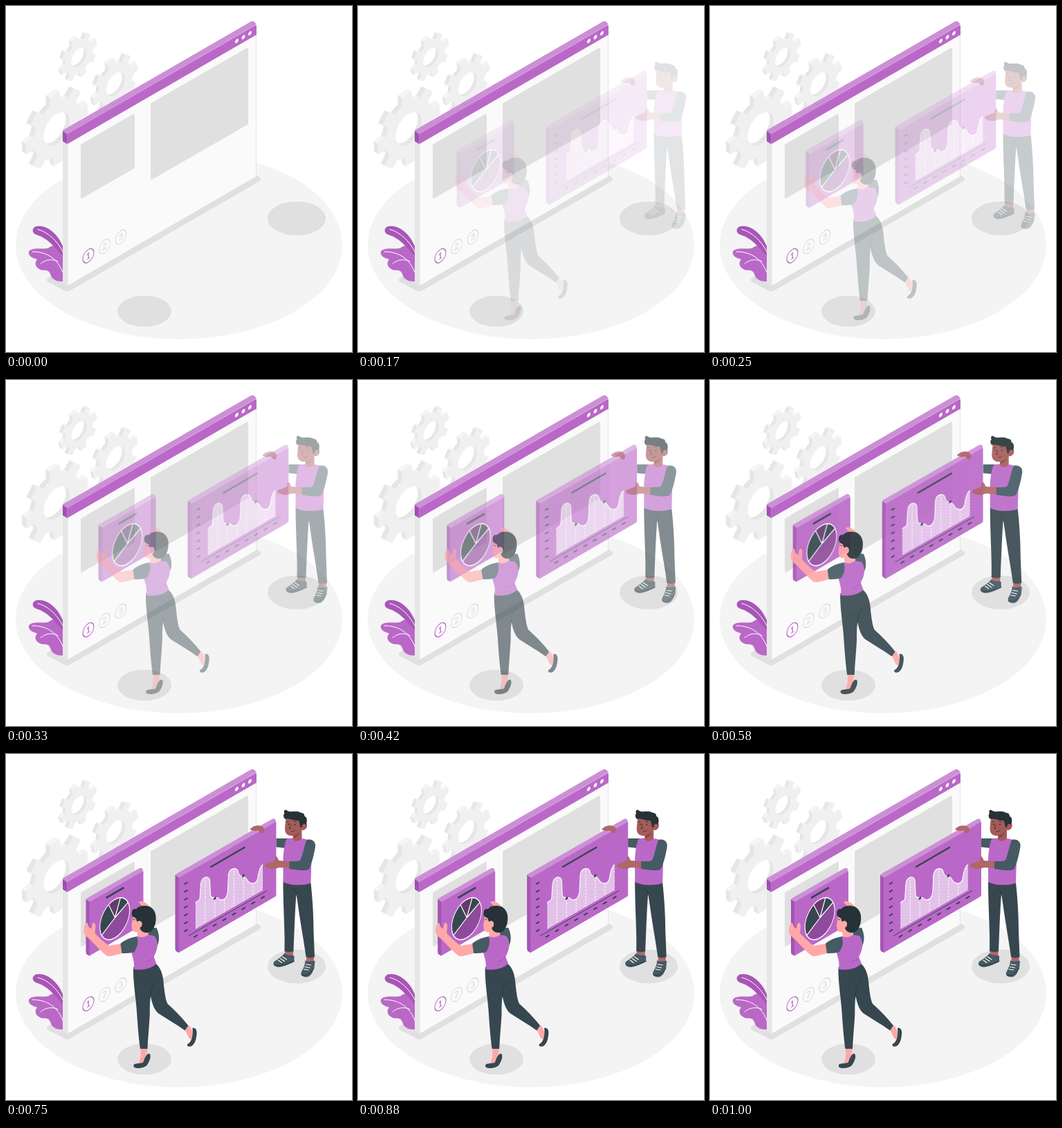
Animation, 500 px wide and 500 px high, one loop 1040 ms. Source, as an HTML page:

```html
<!DOCTYPE html>
<html lang="en">
<head>
<meta charset="utf-8">
<title>Page building</title>
<style>
  html, body { margin: 0; width: 100%; height: 100%; overflow: hidden; background: #fff; }
  svg { display: block; width: 100%; height: 100%; }
  .round { stroke-linejoin: round; stroke-width: 3; }
  .line { fill: none; stroke-linecap: round; stroke-linejoin: round; }
  .line.flat { stroke-linecap: butt; }
  .num { font: 600 12.5px Lato, "Open Sans", sans-serif; text-anchor: middle; }
</style>
</head>
<body>
<svg viewBox="0 0 500 500">
  <ellipse cx="250" cy="345.5" rx="236" ry="136" fill="#f4f4f4"/>
  <g fill="#e0e0e0">
    <ellipse cx="420" cy="307" rx="42" ry="24.5"/>
    <ellipse cx="200" cy="441" rx="39" ry="22.5"/>
    <path d="M62 392L82 385L362 245L367 247.500Q370 250 366 253.500L93 411Q88 414 84 411L61 399Q56 395 62 392Z"/>
  </g>
  <g id="gears"></g>

  <!-- plant -->
  <path fill="#ba68c8" d="M82 349C76 345 66 345 61 350C52 352 38 348 33 355C32 361 37 364 45 366C41 371 42 377 48 380C52 383 57 381 61 383C65 386 64 391 68 394C72 398 77 398 82 398Z"/>
  <path fill="#a855b7" d="M82 347C74 327 57 315 43 318.500C36 322 38 329 45 331C59 335 69 347 82 361Z"/>
  <g class="line" stroke="#fff" stroke-width="1">
    <path d="M46 323C60 326 74 339 82 355M38 355C60 355 75 366 82 385M50 372.500C57 366 68 365 75 369"/>
  </g>

  <!-- window -->
  <path fill="#e6e6e6" d="M82 195L89 199V405L82 401Z"/>
  <path fill="#fafafa" stroke="#e0e0e0" stroke-width=".8" d="M89 199L361.500 41V246.500L89 404.500Z"/>
  <path fill="#cc8fd6" d="M82 181.500Q81.500 180 83 179L353 23Q356 21 359 23L362 26.500L88.500 185Z"/>
  <path fill="#ba68c8" d="M88.500 185L360 28Q362 27 362 29V41.500L88.500 199.500Z"/>
  <path fill="#a04fb0" d="M82 181L88.500 185V199.500L82 195.500Z"/>
  <g id="dots" fill="#fff"></g>
  <g class="round" fill="#e0e0e0" stroke="#e0e0e0">
    <path d="M109.500 201L184.500 157.500V233.500L109.500 276.500Z"/>
    <path d="M210.500 141.500L348.500 62V170L210.500 249.500Z"/>
  </g>
  <g id="steps"></g>

  <g class="moving" id="cards"></g>

  <g class="moving">
    <!-- man -->
    <path fill="#455a64" d="M392 122L410 122L405 136L392 134.500Z"/>
    <path fill="#b16668" d="M354 109C358 104 364 102 370 104C375 106 376 110 373 115C368 115 369 111 365 110.500C361 112 358 111 354 109Z"/>
    <path fill="#b16668" d="M405 284H417L416 293L404 291ZM435.500 292H447L446 301H435.500Z"/>
    <path fill="#37474f" d="M402 184C412 190 432 190 442 186C444 205 446 230 446 255L447.500 293C443 295 439 295 435 293C432 270 427 245 423 215L421 202C419 230 418 260 417 285C412 287 408 286 404 285C405 260 402 220 402 184Z"/>
    <path class="line" stroke="#263238" stroke-width=".8" d="M421 204Q421 197 416 194"/>
    <path fill="#455a64" d="M404 288C409 293 415 289 418 292V300C412 303 405 307 396 308C390 308 386 304 389 300C394 297 400 293 404 288ZM434 298C438 302 444 298 448 299L447 309C445 314 443 320 438 322C432 323 427 321 428 316C430 311 434 306 434 298Z"/>
    <path class="line" stroke="#fff" stroke-width="1.200" d="M401 293L407 297M398 295.500L404 299.500M395 298L400 301.500M435 304L442 305M433.500 307.500L440.500 309M432 311L438.500 312"/>
    <path class="line" stroke="#263238" stroke-width=".9" d="M389 304.500Q394 309 418 299.500M428.500 319Q437 324 446.500 310"/>
    <path fill="#ba68c8" d="M407 123C412 121 428 121 436 123.500L443 150L442 186C432 191 412 190 402 185V150C403 138 404 130 407 123Z"/>
    <path fill="#a55b58" d="M406 91L404.500 108C404.500 116 410 119 416.500 118L416 123C419 128 427 126 429 121.500L429 110C434 111 437.500 106 436.500 102C435 98 430 99 429 103L424 95Z"/>
    <path fill="#854640" d="M416.500 118C421 117 424 115 426 112C425 117 421 121 416.300 121Z"/>
    <path fill="#263238" d="M405 94C402 92 402 87 404 86C402 82 405 79 408 82C413 85 421 81 428 85C432 85 433 88 433 90C437 91 437 98 435 103C433 99 430 100 428.500 107C425 105 427 99 424 96C417 97 411 92 405 94Z"/>
    <g fill="#263238"><circle cx="410" cy="101.500" r="1"/><circle cx="419" cy="102" r="1"/></g>
    <path class="line" stroke="#263238" stroke-width=".8" d="M407 98.500L410 97.500M417.500 97L421 98.500M413 102L411 107.500L413.500 108M414 112Q417 112.500 419 110.500"/>
    <path fill="#b16668" d="M412 155L396 154L393 148.500C391 147 389.500 150 390 154L377 159C374 161 376 164 380 164.500C386 167 391 166 396 164L412 165Z"/>
    <path fill="#455a64" d="M436 124C444 122 449.500 127 448.500 134C447 143 444 157 440 165C438 170 425 168 411 166V155C419 155 426 156 427.500 152C431 144 432 134 436 124Z"/>

    <!-- woman -->
    <path fill="#ffa8a7" d="M193 214C197 211 202 214 206 217L213 224L212 228L200 222Z"/>
    <path fill="#455a64" d="M207 252L219 251C223 259 224 270 220 277L207 268Z"/>
    <path fill="#ffa8a7" d="M196 425H206L204 436C202 443 199 447 192 449C196 442 197 435 196 425ZM260 398L266 392C270 397 273 405 271 413L266 411Z"/>
    <path fill="#37474f" d="M186 449C190 446 198 448 200 445C202 439 205 432 209 433C212 437 209 444 205 450C200 455 188 455 186 452ZM271 396C276 395 278 400 277 406C276 413 275 418 270 422C266 424 262 422 264 419C270 416 272 408 271 396Z"/>
    <path fill="#37474f" d="M185.500 308C195 312 208 308 218 303C226 309 229 322 229.500 334C231 346 232 355 235 361C245 370 256 381 265 392.500L260 399.500C247 390 234 383 222 375C216 370 213 362 210.500 350C208.500 365 210 372 209 382C208 398 206.500 413 206 426H195.500C193.500 413 192 395 190.500 372C189 350 185 330 185.500 308Z"/>
    <path class="line" stroke="#263238" stroke-width=".8" d="M210.500 350Q209 336 218 328"/>
    <path fill="#ba68c8" d="M187 265C197 260 208 261 216 263C222 270 222 281 215 293L219 303C210 311 197 313 186 311C188 300 184 292 182 284Z"/>
    <path class="line" stroke="#9a4fa9" stroke-width=".8" d="M215 293Q211 299 204 300"/>
    <path fill="#ffa8a7" d="M187 230C184 238 184 243 183 247C183 255 185 258 191 257L192 264C198 266 206 264 207 259L206 240Z"/>
    <path fill="#263238" d="M184 234C182 229 184 222 190 224C193 219 203 218 210 221C217 225 219 233 218 241C217 250 213 257 207 258C201 259 196 256 195 251C199 248 199 243 195 241C192 241 191 244 190 240C190 236 187 237 184 234Z"/>
    <ellipse cx="194.500" cy="246" rx="3.500" ry="4.500" fill="#ffa8a7"/>
    <path class="line" stroke="#263238" stroke-width=".8" d="M185.500 239L188 239.500"/>
    <path fill="#ffa8a7" d="M116 246C113 252 113 259 117 263C126 270 138 285 147 291.500C150 293 155 292 169 288V274L150 277C143 272 136 265 130 259L131 248C130 243 127 242 126 247L125 252C122 252 121 250 120 246C119 243 117 243 116 246Z"/>
    <path fill="#455a64" d="M167 274C172 269 182 265 190 264C194 270 191 280 187 286C181 288 174 288 169 288Z"/>
  </g>
</svg>
<script>
const NS = "http://www.w3.org/2000/svg";
const $ = id => document.getElementById(id);
const PURPLE = "#ba68c8", DARK = "#37474f";

function add(parent, tag, attrs, text) {
  const el = document.createElementNS(NS, tag);
  for (const k in attrs) el.setAttribute(k, attrs[k]);
  if (text) el.textContent = text;
  parent.appendChild(el);
  return el;
}
const path = (parent, d, attrs) => add(parent, "path", { d, ...attrs });
const line = (parent, d, stroke, width, extra) =>
  path(parent, d, { class: "line", stroke, "stroke-width": width, ...extra });
const flat = (parent, d, stroke, width, extra) =>
  line(parent, d, stroke, width, { class: "line flat", ...extra });
// Left-hand isometric wall
const wall = (x, y) => `matrix(.866 -.5 0 1 ${x} ${y})`;

function gear(x, y, r, turn, depth) {
  const pts = [];
  for (let i = 0; i < 8; i++) {
    for (const [a, k] of [[-22, .75], [-13, .76], [-9, 1], [9, 1], [13, .76]]) {
      const t = (i * 45 + turn + a) * Math.PI / 180;
      const u = r * k * Math.cos(t), v = r * k * Math.sin(t);
      pts.push([x + .866 * u, y - .5 * u + v]);
    }
  }
  const h = r * .42;
  const hole = `M${-h} 0A${h} ${h} 0 1 0 ${h} 0A${h} ${h} 0 1 0 ${-h} 0Z`;
  const id = "hole" + r;
  const g = add($("gears"), "g");
  const rim = "M" + pts.map(p => p.map(n => n.toFixed(2)).join(" ")).join("L") + "Z";
  const back = (s) => `translate(${-s} ${-s * .577})`;

  for (let s = depth; s > 0; s -= .5) path(g, rim, { fill: "#e6e6e6", transform: back(s) });
  // Upward faces catch the light
  pts.forEach(([ax, ay], i) => {
    const [bx, by] = pts[(i + 1) % pts.length];
    if (bx - ax > Math.abs(by - ay)) {
      path(g, `M${ax} ${ay}L${bx} ${by}l${-depth} ${-depth * .577}L${ax - depth} ${ay - depth * .577}Z`, { fill: "#f5f5f5" });
    }
  });
  path(g, rim, { fill: "#f0f0f0" });
  path(add(g, "clipPath", { id }), hole, { transform: wall(x, y) });
  const inner = add(g, "g", { "clip-path": `url(#${id})` });
  path(inner, hole, { fill: "#e6e6e6", transform: wall(x, y) });
  path(inner, hole, { fill: "#fff", transform: wall(x - depth, y - depth * .577) });
}
gear(73.5, 177.5, 52, -4, 6);
gear(158.5, 113, 37.5, -12, 4.5);
gear(105.5, 74, 30.4, -15, 4);

for (let i = 0; i < 3; i++) {
  add($("dots"), "circle", { r: 2.8, transform: wall(333.5 + i * 9.5, 50.5 - i * 5.5) });
  const g = add($("steps"), "g", { transform: wall(119 + i * 23.5, 361 - i * 13.6) });
  const color = i ? "#dcdcdc" : PURPLE;
  add(g, "circle", { r: 9.2, fill: "none", stroke: color, "stroke-width": 1.2 });
  add(g, "text", { class: "num", y: 4.5, fill: color }, String(i + 1));
}

// Slab: front face w wide with its top-left corner at x, y
function slab(x, y, w, h) {
  const g = $("cards"), rise = w * .575;
  const top = y - rise, right = x + w;
  path(g, `M${x - 5} ${y - 3}Q${x - 5} ${y - 5} ${x - 3} ${y - 6}L${right - 6} ${top - 4}Q${right - 3} ${top - 5} ${right - 1} ${top - 3}L${right} ${top + 2}L${x} ${y + 2}Z`, { fill: "#cc8fd6" });
  path(g, `M${x - 5} ${y - 4}L${x + 1} ${y}V${y + h}L${x - 3} ${y + h - 2}Q${x - 5} ${y + h - 3} ${x - 5} ${y + h - 6}Z`, { fill: "#a455b3" });
  path(g, `M${x} ${y + 2}Q${x} ${y} ${x + 2} ${y - 1}L${right - 2} ${top + 1}Q${right} ${top} ${right} ${top + 2}V${top + h - 3}Q${right} ${top + h - 1} ${right - 2} ${top + h}L${x + 3} ${y + h - 2}Q${x} ${y + h} ${x} ${y + h - 3}Z`, { fill: PURPLE });
  return g;
}

function pieCard() {
  const g = slab(122, 214, 78, 78);
  flat(g, "M146 208L172 193", DARK, 2.6);
  const at = { r: 24.8, transform: wall(158.7, 238) + " scale(1 1.12)" };
  add(add(g, "clipPath", { id: "pie" }), "circle", at);
  add(g, "circle", { ...at, fill: "#8e4a9b" });
  const slices = add(g, "g", { "clip-path": "url(#pie)" });
  path(slices, "M159 236.500L148 214L120 220V288Z", { fill: DARK });
  path(slices, "M159 236.500L148 214L155 195L169 200Z", { fill: "#663a70" });
  path(slices, "M159 236.500L169 200L190 200Z", { fill: DARK });
  line(slices, "M159 236.500L148 214M159 236.500L169 200M190 200L159 236.500L130 275", "#fff", 1.2);
  add(g, "circle", { ...at, fill: "none", stroke: "#fff", "stroke-width": 1.2 });
}

function chartCard() {
  const g = slab(251, 179, 141, 108.5);
  flat(g, "M297 163.5L347 134.500", DARK, 2.6);
  line(g, "M265 263L379 197.500", DARK, 1);
  const curve = "M275.500 215C279 210 282 215 282 203L283 188C284 177 294 175 296 182L297 203C298 210 303 206 308 208C313 214 321 210 322 198L323 174C325 164 336 163 337 170C339 180 345 174 349 180C352 188 362 190 365 181C367 168 369 162 372.500 160";
  const area = curve + "V197L275.500 253Z";
  path(add(g, "clipPath", { id: "area" }), area);
  path(g, area, { fill: "#fff", opacity: .6 });
  const rules = add(g, "g", { "clip-path": "url(#area)" });
  for (let i = 0; i < 8; i++) {
    const x = 275.5 + i * 13.86, y = 263.3 - i * 8;
    flat(rules, `M${x} 160V255`, "#fff", 1, { "stroke-dasharray": "2.500 2" });
    flat(g, `M${x - 2.7} ${y + 1.5}L${x + 2.7} ${y - 1.6}`, DARK, 2);
    if (i < 7) flat(g, `M259 ${188.2 + i * 11.4}L264 ${185.3 + i * 11.4}`, DARK, 2);
  }
  line(g, curve, "#fff", 1.1);
  for (const [x, y] of [[303.5, 208.5], [344.5, 176]]) {
    add(g, "circle", { r: 2.1, fill: DARK, transform: wall(x, y) });
  }
}
chartCard();
pieCard();

// cubic-bezier(.36, -.01, .5, 1.38)
const bez = (s, a, b) => 3 * (1 - s) ** 2 * s * a + 3 * (1 - s) * s * s * b + s ** 3;
function ease(t) {
  let lo = 0, hi = 1;
  for (let i = 0; i < 24; i++) {
    const m = (lo + hi) / 2;
    if (bez(m, .36, .5) < t) lo = m; else hi = m;
  }
  return bez(hi, -.01, 1.38);
}

const LOOP = 1040, STEPS = 25, SHIFT = 30;
const moving = document.querySelectorAll(".moving");
const start = performance.now();

function draw() {
  const t = (performance.now() - start) % LOOP;
  const step = Math.min(STEPS - 1, Math.floor((t + 4) * STEPS / LOOP));
  const p = step < 2 ? 0 : ease((step + 1) / STEPS);
  for (const g of moving) {
    g.setAttribute("transform", `translate(${(SHIFT * (1 - p)).toFixed(2)} 0)`);
    g.setAttribute("opacity", Math.min(1, Math.max(0, p)).toFixed(3));
  }
  requestAnimationFrame(draw);
}
draw();
</script>
</body>
</html>
```
